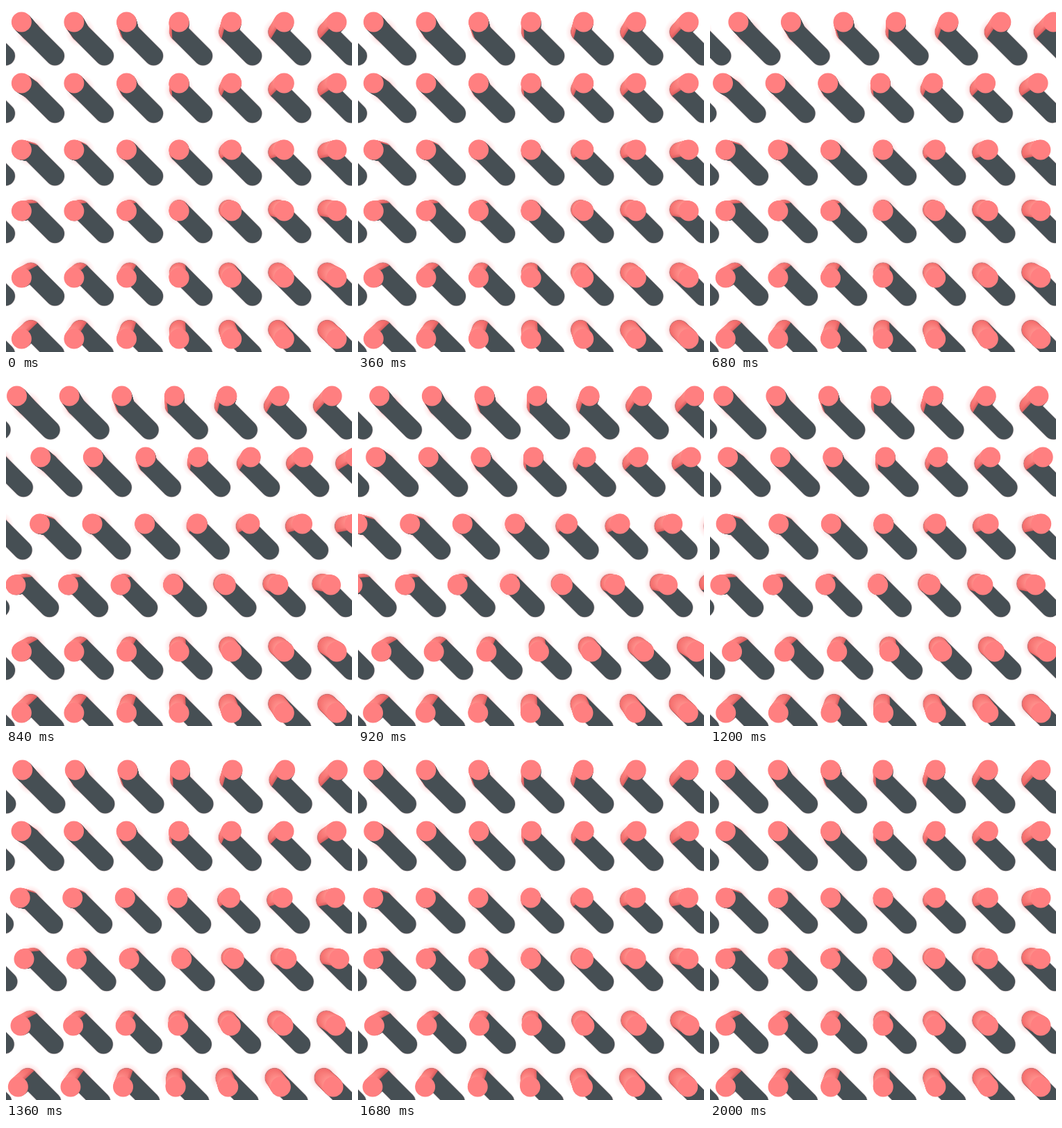
Recreate the animation shown at these times as an HTML page with a canvas. Size 498 px wide and 498 px high, loop 2040 ms.

```html
<!DOCTYPE html>
<html lang="en">
<head>
<meta charset="utf-8">
<title>Sliding pegs</title>
<style>
html, body { margin: 0; width: 100%; height: 100%; overflow: hidden; background: #fff; }
canvas { display: block; }
</style>
</head>
<body>
<canvas id="stage" width="498" height="498"></canvas>
<script>
const ctx = document.getElementById('stage').getContext('2d');
const LOOP = 2040, STAGGER = 67, START = 565, ARRIVE = 868;
const ROWS = [23, 111, 207, 295, 391, 479];
const LEFT = 22.3, GAP = 75.6, RADIUS = 14.5;
const VANISH = { x: 249, y: 262 }, DEPTH = 0.94, CAST = 34.5;
const CAP = '#ff7f80', SHADE = '#464f54', SLICES = 16;

// Side colour at height h (0 floor, 1 cap), lit from the upper left.
const sides = Array.from({ length: SLICES }, (_, i) => {
  const h = i / SLICES;
  const g = ctx.createLinearGradient(-0.707, -0.707, 0.707, 0.707);
  g.addColorStop(0, `rgb(${245 + 10 * h}, ${112 + 34 * h}, ${110 + 32 * h})`);
  g.addColorStop(0.3, `rgb(${240 + 12 * h}, ${104 + 24 * h}, ${103 + 24 * h})`);
  g.addColorStop(0.46, '#d95f60');
  g.addColorStop(0.5, SHADE);
  g.addColorStop(1, SHADE);
  return g;
});

const glow = ctx.createRadialGradient(0, 0, 0.9, 0, 0, 1.6);
glow.addColorStop(0, 'rgba(255, 90, 95, .42)');
glow.addColorStop(0.4, 'rgba(255, 110, 115, .13)');
glow.addColorStop(1, 'rgba(255, 120, 125, 0)');

// Fraction of a step travelled: eased move, then a decaying overshoot.
function travel(t) {
  if (t <= START) return 0;
  if (t < ARRIVE) {
    const u = (t - START) / (ARRIVE - START);
    return u * u * (2.09 - 1.09 * u);
  }
  const s = (t - ARRIVE) / 1000;
  return 1 + 0.2 * Math.exp(-4.7 * s) * Math.sin(2 * Math.PI * 2.4 * s);
}

function project(x, y, scale) {
  return [VANISH.x + (x - VANISH.x) * scale, VANISH.y + (y - VANISH.y) * scale];
}

function disc(x, y, r, fill, size = 1) {
  ctx.save();
  ctx.translate(x, y);
  ctx.scale(r, r);
  ctx.fillStyle = fill;
  ctx.beginPath();
  ctx.arc(0, 0, size, 0, 2 * Math.PI);
  ctx.fill();
  ctx.restore();
}

function line(x, y, width, color) {
  ctx.lineCap = 'round';
  ctx.lineWidth = width;
  ctx.strokeStyle = color;
  ctx.beginPath();
  ctx.moveTo(x, y);
  ctx.lineTo(x + CAST, y + CAST);
  ctx.stroke();
}

function peg(x, y) {
  const [bx, by] = project(x, y, DEPTH), r = RADIUS * DEPTH;
  disc(bx, by, r, glow, 1.6);
  line(bx, by, 2 * r + 1.4, 'rgba(150, 110, 112, .35)');
  line(bx, by, 2 * r, SHADE);
  sides.forEach((fill, i) => {
    const scale = DEPTH + (1 - DEPTH) * i / SLICES;
    disc(...project(x, y, scale), RADIUS * scale, fill);
  });
  disc(x, y, RADIUS, CAP);
}

function draw(now) {
  const t = now % LOOP;
  ctx.fillStyle = '#fff';
  ctx.fillRect(0, 0, 498, 498);
  ROWS.forEach((y, row) => {
    const shift = travel(t - row * STAGGER) * (row % 2 ? -GAP : GAP);
    for (let col = -3; col < 9; col++) peg(LEFT + col * GAP + shift, y);
  });
}

const begin = performance.now();
function tick() {
  draw(performance.now() - begin);
  requestAnimationFrame(tick);
}
tick();
</script>
</body>
</html>
```
